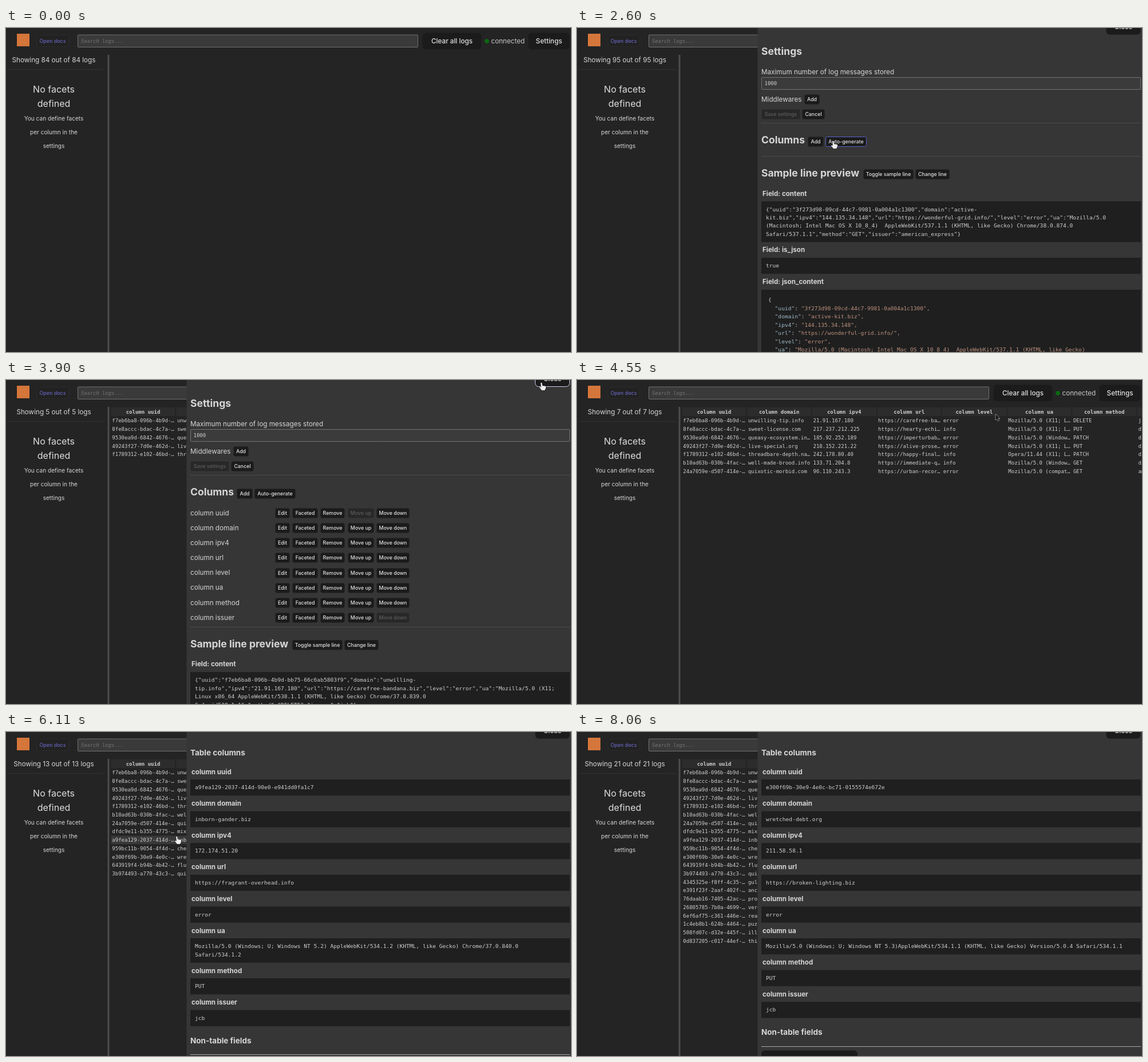
Recreate the animation shown at these times as an HTML page with a canvas. Size 987x567 px, loop 8190 ms.

```html
<!DOCTYPE html>
<html lang="en">
<head>
<meta charset="utf-8">
<title>Log viewer</title>
<style>
  html, body { margin: 0; width: 100%; height: 100%; overflow: hidden; background: #242424; }
  canvas { display: block; }
</style>
</head>
<body>
<canvas id="stage" width="987" height="567"></canvas>
<script>
const ctx = document.getElementById('stage').getContext('2d');
const W = 987, H = 567, LOOP = 8190, STEP = 130;
const SANS = 'Inter, sans-serif', MONO = '"DejaVu Sans Mono", monospace';
const PANEL = 315.5, ROW = 14.72, COL = 113.6;
const OPEN = 780, GENERATED = 2730, CLOSED = 4030, DETAIL = 6110, NEXT = 7540;

// uuid | domain | ipv4 | url | level | ua | method | issuer
const logs = `f7eb6ba8-096b-4b9d-bb75-66c6ab5803f9|unwilling-tip.info|21.91.167.180|https://carefree-bandana.biz|error|Mozilla/5.0 (X11; Linux x86_64|DELETE|jcb
8fe8accc-bdac-4c7a-|sweet-license.com|217.237.212.225|https://hearty-echidna.com|info|Mozilla/5.0 (X11; Linux x86_64|PUT|discover
9530ea9d-6842-4676-|queasy-ecosystem.info|185.92.252.189|https://imperturbable-oak.org|error|Mozilla/5.0 (Windows; U|PATCH|discover
49243f27-7d0e-462d-|live-special.org|218.152.221.22|https://alive-prosecutor.net|error|Mozilla/5.0 (X11; Linux x86_64|PUT|diners_club
f1789312-e102-46bd-|threadbare-depth.name|242.178.80.40|https://happy-finally.org|info|Opera/11.44 (X11; Linux x86_64|PATCH|discover
b10ad63b-030b-4fac-|well-made-brood.info|133.71.204.8|https://immediate-quail.com|info|Mozilla/5.0 (Windows; U|GET|diners_club
24a7059e-d507-414e-|quixotic-morbid.com|96.110.243.3|https://urban-record.net|error|Mozilla/5.0 (compatible; MSIE|GET|american_express
dfdc9e11-b355-4775-|mixed-chef.biz|45.59.150.107|https://ample-splendor.org|info|Opera/13.56 (X11; Linux x86_64|DELETE|discover
a9fea129-2037-414d-90e0-e941dd0fa1c7|inborn-gander.biz|172.174.51.20|https://fragrant-overhead.info|error|Mozilla/5.0 (Windows; U; Windows NT 5.2) AppleWebKit/534.1.2 (KHTML, like Gecko) Chrome/37.0.840.0\nSafari/534.1.2|PUT|jcb
959bc11b-9054-4f4d-|cheap-underclothes.com|138.17.156.165|https://demanding-snow.biz|error|Mozilla/5.0 (compatible; MSIE|POST|maestro
e300f69b-30e9-4e0c-bc71-0155574e672e|wretched-debt.org|211.58.58.1|https://broken-lighting.biz|error|Mozilla/5.0 (Windows; U; Windows NT 5.3)AppleWebKit/534.1.1 (KHTML, like Gecko) Version/5.0.4 Safari/534.1.1|PUT|jcb
643919f4-b94b-4b42-|fluffy-lantern.com|64.18.92.140|https://quiet-meadow.info|info|Mozilla/5.0 (X11; Linux x86_64|GET|discover
3b974493-a770-43c3-|quick-walnut.org
4345325e-f8ff-4c35-|gullible-pear.biz
e391f23f-2aaf-402f-|ancient-spoon.net
76daab16-7405-42ac-|proud-kettle.com
26805785-7b0a-4699-|verdant-hill.info
6ef6af75-c361-446e-|ready-button.org
1c4eb8b1-624b-4464-|puzzled-fern.com
508fd07c-d32e-445f-|ill-basket.biz
0d837205-c017-44ef-|thick-ribbon.net`.split(/\n(?=[0-9a-f]{8}-)/).map(l => l.split('|'));
const fields = ['uuid', 'domain', 'ipv4', 'url', 'level', 'ua', 'method', 'issuer'];

const oldSample = [
  '{"uuid":"3f273d98-09cd-44c7-9981-0a004a1c1300","domain":"active-',
  'kit.biz","ipv4":"144.135.34.148","url":"https://wonderful-grid.info/","level":"error","ua":"Mozilla/5.0',
  '(Macintosh; Intel Mac OS X 10_8_4)  AppleWebKit/537.1.1 (KHTML, like Gecko) Chrome/38.0.874.0',
  'Safari/537.1.1","method":"GET","issuer":"american_express"}'];
const newSample = [
  '{"uuid":"f7eb6ba8-096b-4b9d-bb75-66c6ab5803f9","domain":"unwilling-',
  'tip.info","ipv4":"21.91.167.180","url":"https://carefree-bandana.biz","level":"error","ua":"Mozilla/5.0 (X11;',
  'Linux x86_64 AppleWebKit/538.1.1 (KHTML, like Gecko) Chrome/37.0.839.0',
  'Safari/538.1.1","method":"DELETE","issuer":"jcb"}'];
const json = [
  ['uuid', '"3f273d98-09cd-44c7-9981-0a004a1c1300",'],
  ['domain', '"active-kit.biz",'],
  ['ipv4', '"144.135.34.148",'],
  ['url', '"https://wonderful-grid.info/",'],
  ['level', '"error",'],
  ['ua', '"Mozilla/5.0 (Macintosh; Intel Mac OS X 10_8_4)  AppleWebKit/537.1.1 (KHTML, like Gecko)']];

// Pointer stops: time, x, y
const stops = [
  [0, 1010, 70], [130, 1000, 60], [520, 946, 22], [780, 946, 22], [1170, 663, 119],
  [1950, 446, 198], [2730, 446, 198], [3640, 934, 5], [4030, 934, 5], [5330, 358, 161],
  [5850, 297, 183], [7020, 297, 183], [7410, 297, 214], [7540, 297, 214], [7930, 250, 600], [LOOP, 250, 600]];

let mouse = { x: 0, y: 0 }, hand = false;

function pointerAt(t) {
  const i = Math.max(1, stops.findIndex(s => s[0] > t));
  const [t0, x0, y0] = stops[i - 1], [t1, x1, y1] = stops[i];
  const p = (t - t0) / (t1 - t0), e = p * p * (3 - 2 * p);
  return { x: x0 + (x1 - x0) * e, y: y0 + (y1 - y0) * e };
}

function logCount(t) {
  if (t < GENERATED) return 84 + Math.floor((t + 160) / 250);
  return Math.floor((t - (t < 5720 ? 2640 : 2790)) / 250);
}

function rect(x, y, w, h, color) {
  ctx.fillStyle = color;
  ctx.fillRect(x, y, w, h);
}

function box(x, y, w, h, r, fill, line) {
  ctx.beginPath();
  ctx.roundRect(x, y, w, h, r);
  if (fill) { ctx.fillStyle = fill; ctx.fill(); }
  if (line) { ctx.strokeStyle = line; ctx.stroke(); }
}

// y is the middle of the capitals
function text(s, x, y, size, { color = '#d6d6d6', weight = 400, family = SANS, align = 'left', style = '' } = {}) {
  ctx.font = `${style} ${weight} ${size}px ${family}`;
  ctx.fillStyle = color;
  ctx.textAlign = align;
  ctx.fillText(s, x, y + size * 0.36);
}

const mono = (s, x, y, size = 9, opts) => text(s, x, y, size, { family: MONO, color: '#cfcfcf', ...opts });
const heading = (s, y, size = 17.5, x = 322) => text(s, x, y, size, { weight: 700 });
const over = (x, y, w, h) => mouse.x >= x && mouse.x < x + w && mouse.y >= y && mouse.y < y + h;

function button(s, x0, x1, y0, y1, { size = 8.8, off = false, ring = '#5a62cf', radius = 3, live = true } = {}) {
  const hot = live && !off && over(x0, y0, x1 - x0, y1 - y0);
  hand = hand || hot;
  box(x0 + .5, y0 + .5, x1 - x0 - 1, y1 - y0 - 1, radius, off ? '#282828' : '#1b1b1b', hot && ring);
  text(s, (x0 + x1) / 2, (y0 + y1) / 2, size, { weight: 500, align: 'center', color: off ? '#5c5c5c' : '#e2e2e2' });
}

function rule(y, x = 322, color = '#4b4b4b') {
  rect(x, y, 985 - x, 1, color);
}

function block(y, lines) {
  const h = 28.2 + (lines.length - 1) * 14.4;
  rect(322, y, 663, h, '#1f1f1f');
  lines.forEach((s, i) => mono(s, 330, y + 13.8 + i * 14.4, 9.58));
  return h;
}

function sidebar(n) {
  const center = { align: 'center' };
  text(`Showing ${n} out of ${n} logs`, 83.5, 56, 11.7, center);
  rect(2, 72, 171, 1, '#323232');
  text('No facets', 83.5, 107.5, 16, { ...center, color: '#dedede' });
  text('defined', 83.5, 132, 16, { ...center, color: '#dedede' });
  ['You can define facets', 'per column in the', 'settings']
    .forEach((s, i) => text(s, 83.5, 158 + i * 24.4, 10.1, center));
  rect(177.5, 47, 3, H, '#4c4c4c');
}

function topBar(live) {
  box(19, 10, 22, 22, 0, '#d5763a');
  box(54.5, 12.5, 55, 20, 4, '#222', '#2b2b2b');
  text('Open docs', 81.5, 22.5, 8.9, { weight: 500, align: 'center', color: '#6762bd' });
  box(125.5, 12, 594, 21.5, 1, '#3a3a3a', '#707070');
  mono('Search logs...', 131, 23, 8.8, { style: 'italic', color: '#757575' });
  button('Clear all logs', 727, 831, 8, 38, { size: 11.7, radius: 6, live });
  ctx.beginPath();
  ctx.arc(840, 23, 3.8, 0, 7);
  ctx.fillStyle = '#086a10';
  ctx.fill();
  text('connected', 847.5, 23, 11.7, { color: '#c9c9c9' });
  button('Settings', 912, 985, 8, 38, { size: 11.7, radius: 6, live });
}

function clip(s, i) {
  return i === 0 ? s.slice(0, 19) + '…' : s.length > 20 ? s.slice(0, 19) + '…' : s;
}

function table(n, right) {
  rect(183.5, 48, W, 15, '#2c2c2c');
  fields.forEach((f, i) => {
    mono('column ' + f, 239.5 + i * COL, 55.5, 9, { weight: 700, align: 'center' });
    if (i) rect(182.3 + i * COL, 48, 1, 15, '#1f1f1f');
  });
  logs.slice(0, n).forEach((log, r) => {
    const y = 63.7 + r * ROW;
    if (over(183.5, y, right - 183.5, ROW)) {
      hand = true;
      rect(183.5, y, W, ROW, '#393939');
    }
    log.forEach((s, i) => mono(clip(s, i), 185.3 + i * COL, y + 7.4));
  });
}

function panel() {
  rect(PANEL, 0, W, H, '#363636');
  button('Close', 924, 985, -16, 12, { size: 11.7, radius: 6, ring: '#cfcfee' });
}

function settings(generated) {
  panel();
  heading('Settings', 40.5);
  text('Maximum number of log messages stored', 322, 77, 11.7);
  box(322.5, 86.5, 662, 21, 1, '#3b3b3b', '#757575');
  mono('1000', 327.5, 97);
  text('Middlewares', 322, 124.5, 11.7);
  button('Add', 397, 424, 116, 134);
  button('Save settings', 322, 390, 142, 160, { off: true });
  button('Cancel', 393, 433, 142, 160);
  rule(166);
  heading('Columns', 196);
  button('Add', 403, 431, 190, 208);
  button('Auto-generate', 434, 506, 190, 208);
  if (generated) fields.forEach(columnRow);
  sample(generated ? 207.8 : 0, generated);
}

function columnRow(f, i) {
  const y = 233 + i * 26.15, top = Math.round(y - 9), bottom = top + 18;
  text('column ' + f, 322, y - .5, 11.7);
  button('Edit', 470, 496, top, bottom);
  button('Faceted', 500, 545, top, bottom);
  button('Remove', 549, 592, top, bottom);
  button('Move up', 597, 643, top, bottom, { off: i === 0 });
  button('Move down', 647, 705, top, bottom, { off: i === 7 });
}

function sample(dy, generated) {
  rule(Math.round(224 + dy));
  heading('Sample line preview', 253.5 + dy);
  button('Toggle sample line', 500, 588, 247 + dy, 265 + dy);
  button('Change line', 591, 651, 247 + dy, 265 + dy);
  heading('Field: content', 289.5 + dy, 11.6, 324);
  block(303.3 + dy, generated ? newSample : oldSample);
  if (generated) return;
  heading('Field: is_json', 388, 11.6, 324);
  block(402, ['true']);
  heading('Field: json_content', 443.5, 11.6, 324);
  rect(322, 458, 663, H, '#1f1f1f');
  mono('{', 334, 476, 9.58);
  json.forEach(([key, value], i) => {
    const y = 490.5 + i * 14.4, label = `"${key}"`, char = 5.767;
    mono(label, 345.6, y, 9.58, { color: '#9fbccb' });
    mono(':', 345.6 + label.length * char, y, 9.58);
    mono(value, 345.6 + (label.length + 2) * char, y, 9.58, { color: '#bd917d' });
  });
}

function detail(log) {
  panel();
  heading('Table columns', 36.5, 13.5);
  let y = 69.5;
  fields.forEach((f, i) => {
    heading('column ' + f, y, 11.6, 324);
    y += 27.4 + block(y + 13.5, log[i].split('\n'));
  });
  heading('Non-table fields', y + 11, 13.5);
  rule(Math.round(y + 35.5), 322, '#a8a8a8');
  box(322, y + 43, 168, 40, 6, '#1b1b1b');
}

function shape(points, fill, line) {
  ctx.beginPath();
  points.forEach(([x, y]) => ctx.lineTo(mouse.x + x, mouse.y + y));
  ctx.closePath();
  ctx.fillStyle = fill;
  ctx.strokeStyle = line;
  ctx.stroke();
  ctx.fill();
}

function pointer() {
  ctx.lineJoin = 'round';
  if (hand) {
    shape([[0, 0], [2, 0], [3, 5], [9, 6], [9, 9], [7, 13], [2, 13], [-2, 8], [-1, 7], [1, 8]], '#f0f0f0', '#333');
  } else {
    shape([[0, 0], [0, 10], [2.3, 8], [4, 12], [6, 11], [4.2, 7.4], [7.4, 7.2]], '#1a1a1a', '#eee');
  }
}

function draw(t) {
  const n = logCount(t), inSettings = t >= OPEN && t < CLOSED, inDetail = t >= DETAIL;
  const covered = inSettings || inDetail;
  mouse = pointerAt(t);
  hand = false;
  ctx.lineWidth = 1;
  rect(0, 0, W, H, '#242424');
  topBar(!covered);
  sidebar(n);
  if (t >= GENERATED) table(n, covered ? PANEL : W);
  if (inSettings) settings(t >= GENERATED);
  if (inDetail) detail(logs[t < NEXT ? 8 : 10]);
  pointer();
}

function tick() {
  const t = performance.now() % LOOP;
  draw(Math.floor(t / STEP) * STEP);
  requestAnimationFrame(tick);
}
tick();
</script>
</body>
</html>
```
